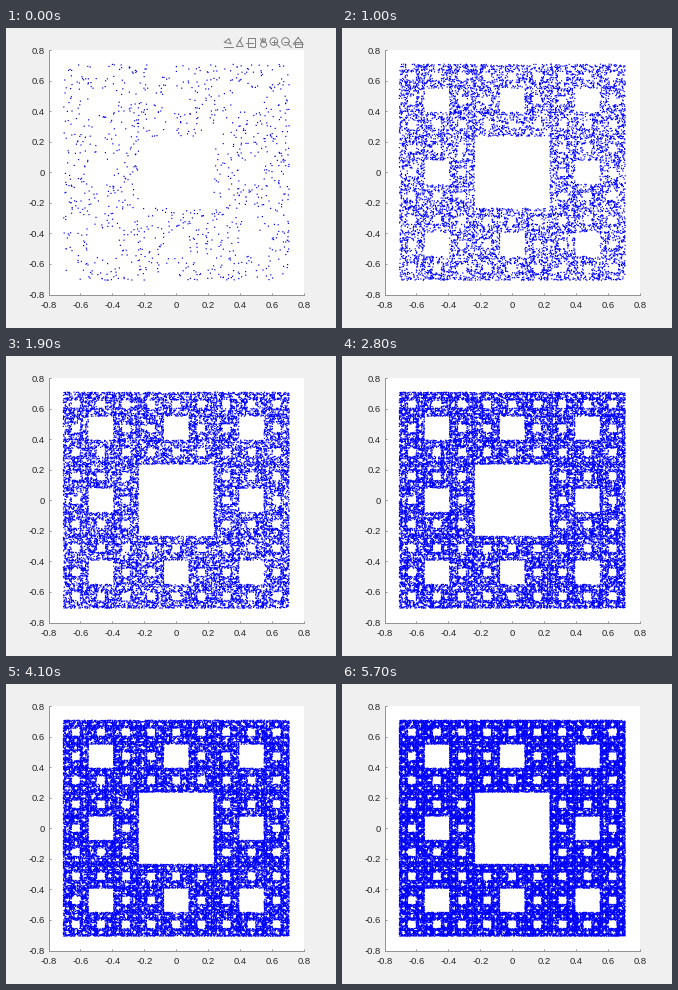
Write a matplotlib script that moves like this. It is 330 px wide and 300 px high and loops after 5.8 s.

```python
import numpy as np
import matplotlib.pyplot as plt
from matplotlib.animation import FuncAnimation

W, H, DPI = 330, 300, 100
FRAMES, INTERVAL = 58, 100
PER_FRAME = 1000
PX = 72 / DPI          # points per pixel
SUB, DOT = 5, 6        # subpixels per pixel, dot size in subpixels
LEFT, RIGHT, TOP, BOTTOM = 42.5, 298, 22, 266.5
LIM = 0.8
TEXT, AXIS, ICON = "#262626", "#949494", "#828282"

plt.rcParams["font.family"] = "Liberation Sans"


def carpet(n, seed=7):
    """Chaos game: jump two thirds of the way to a random corner or edge midpoint."""
    half = np.sqrt(0.5)
    targets = np.array([(x, y) for x in (-1, 0, 1) for y in (-1, 0, 1) if x or y]) * half
    memory = 16
    picks = targets[np.random.default_rng(seed).integers(8, size=n + memory - 1)]
    weights = 2 / 3.0 ** np.arange(1, memory + 1)
    return [np.convolve(picks[:, k], weights, mode="valid") for k in (0, 1)]


def birth_map(xs, ys):
    """For every subpixel of the stage, the first step at which a dot covers it."""
    px = LEFT + (xs + LIM) / (2 * LIM) * (RIGHT - LEFT)
    py = BOTTOM - (ys + LIM) / (2 * LIM) * (BOTTOM - TOP)
    col = np.round(px * SUB - DOT / 2).astype(int)
    row = np.round(py * SUB - DOT / 2).astype(int)
    step = np.arange(len(xs)) // PER_FRAME
    born = np.full((H * SUB, W * SUB), FRAMES)
    for dy in range(DOT):
        for dx in range(DOT):
            np.minimum.at(born, (row + dy, col + dx), step)
    return born.astype(np.uint8)


def toolbar(ax):
    """Row of small plot tools, built from segments and regular polygons."""
    cy, gap = 14.5, 11.7
    lines = []

    def stroke(i, x, y):
        lines.extend(ax.plot(222 + gap * i + np.asarray(x), cy + np.asarray(y),
                             color=ICON, lw=PX))

    def ring(i, x, y, rx, ry, n=24, turn=0.0):
        a = np.linspace(0, 2 * np.pi, n + 1) + turn
        stroke(i, x + rx * np.cos(a), y + ry * np.sin(a))

    up, diag = -np.pi / 2, np.pi / 4
    # Pencil over a line
    ring(0, 0, -1, 4, 3, 3, diag)
    stroke(0, (-4.5, 4.5), (4, 4))
    # Brush
    ring(1, 0, 2, 4, 4, 3, up)
    stroke(1, (0, 2), (-1, -5))
    # Data tip
    ring(2, 0, 0, 5.5, 6.5, 4, diag)
    stroke(2, (-5, 2), (0, 0))
    # Hand
    ring(3, 0.5, 2, 3, 2.8)
    for k in range(4):
        stroke(3, (k - 1.2, 1.7 * k - 2.5), (0, -4.5 + 0.6 * abs(k - 1.5)))
    # Zoom in, zoom out
    for i in (4, 5):
        ring(i, -1, -1, 3.8, 3.8)
        stroke(i, (1.8, 5), (1.8, 5))
        stroke(i, (-3, 1), (-1, -1))
    stroke(4, (-1, -1), (-3, 1))
    # Home
    ring(6, 0, -0.5, 5.8, 4.5, 3, up)
    ring(6, 0, 2, 4.8, 4, 4, diag)
    return lines


fig = plt.figure(figsize=(W / DPI, H / DPI), dpi=DPI, facecolor="#f0f0f0")

ax = fig.add_axes([LEFT / W, 1 - BOTTOM / H, (RIGHT - LEFT) / W, (BOTTOM - TOP) / H])
ticks = np.linspace(-LIM, LIM, 9)
labels = ["0" if abs(t) < 1e-9 else f"{t:.1f}" for t in ticks]
ax.set(xlim=(-LIM, LIM), ylim=(-LIM, LIM))
ax.set_xticks(ticks, labels)
ax.set_yticks(ticks, labels)
ax.tick_params(direction="in", length=2.5 * PX, width=PX, color=AXIS,
               labelsize=9.5 * PX, labelcolor=TEXT)
ax.tick_params(axis="x", pad=6 * PX)
ax.tick_params(axis="y", pad=4 * PX)
ax.spines[["top", "right"]].set_visible(False)
for side in ("left", "bottom"):
    ax.spines[side].set(color=AXIS, linewidth=PX)

# Stage-wide layer in pixel coordinates
stage = fig.add_axes([0, 0, 1, 1])
stage.axis("off")
rgba = np.zeros((H, W, 4))
rgba[..., 2] = 1
dots = stage.imshow(rgba, extent=(0, W, H, 0), aspect="auto", interpolation="nearest")
tools = toolbar(stage)
stage.set(xlim=(0, W), ylim=(H, 0))

born = birth_map(*carpet(FRAMES * PER_FRAME))


def update(i):
    rgba[..., 3] = (born <= i).reshape(H, SUB, W, SUB).mean(axis=(1, 3))
    dots.set_data(rgba)
    for line in tools:
        line.set_visible(i == 0)
    return [dots, *tools]


anim = FuncAnimation(fig, update, frames=FRAMES, interval=INTERVAL,
                     repeat=True, repeat_delay=0, blit=False)
plt.show()
```
